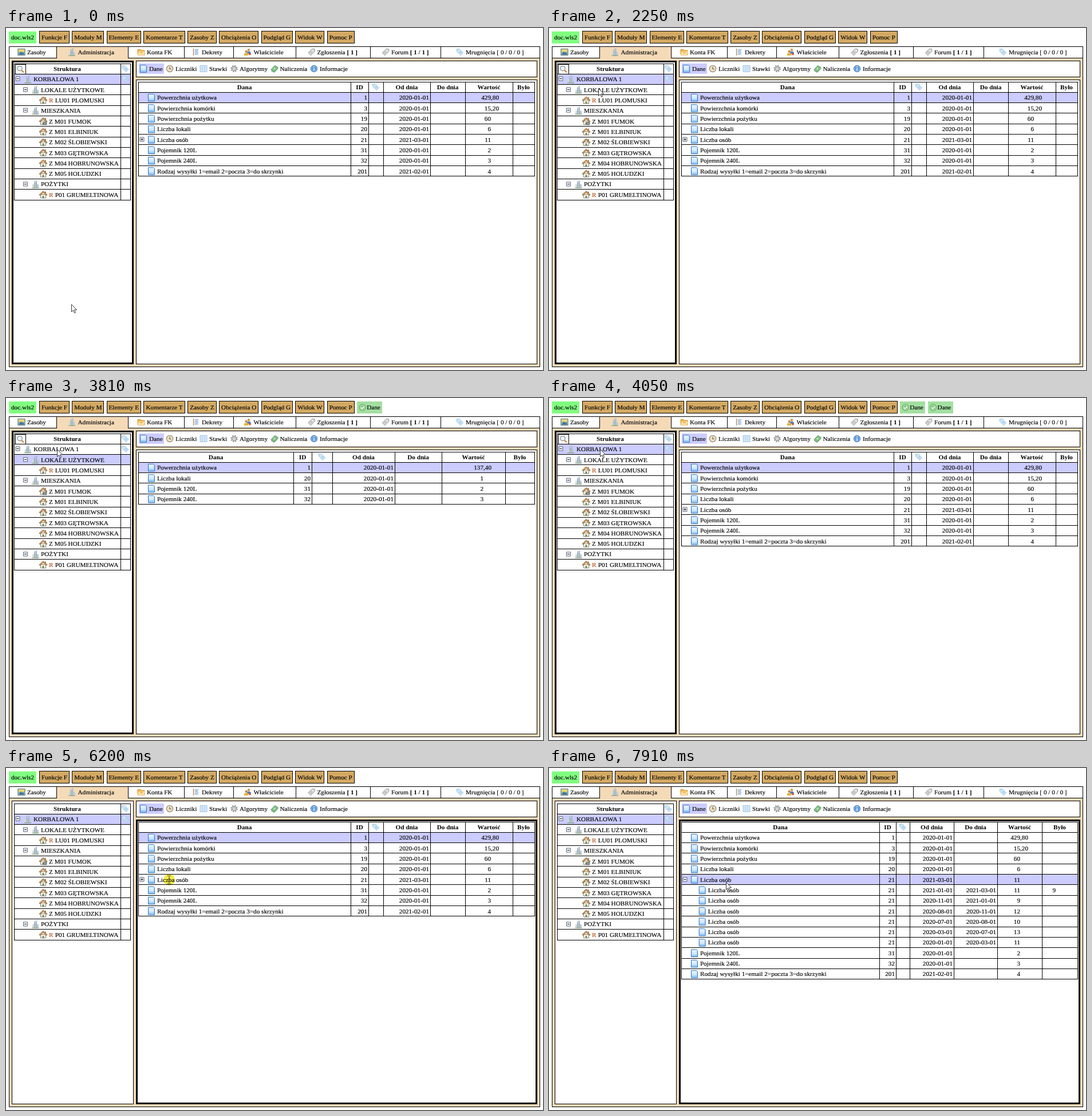
An HTML page that plays this animation: 938 by 597 pixels, repeating every 7.99 s.

```html
<!DOCTYPE html>
<html lang="pl">
<head>
<meta charset="utf-8">
<title>Administracja</title>
<style>
  html, body { margin: 0; width: 100%; height: 100%; overflow: hidden; background: #fff; }
  svg { display: block; }
  text { font: 11.2px "Liberation Serif", "Times New Roman", serif; white-space: pre; color: #000; fill: currentColor; stroke: currentColor; stroke-width: .15px; }
  .b { font-weight: 700; stroke: none; }
  .m { text-anchor: middle; }
  .e { text-anchor: end; }
  .r { color: #b5480f; }
  .crisp { shape-rendering: crispEdges; }
  #click { mix-blend-mode: multiply; }
</style>
</head>
<body>
<svg width="938" height="597" viewBox="0 0 938 597">
  <defs>
    <linearGradient id="sky" x2="0" y2="1"><stop stop-color="#e6f4ff"/><stop offset="1" stop-color="#8cc4f5"/></linearGradient>
    <g id="doc"><path d="M1.5.8h9.2L12.5 2.6v10.8h-11z" fill="url(#sky)" stroke="#3573bd"/><path d="M3.5 4h6M3.5 6.2h7M3.5 8.4h7" stroke="#fff" stroke-width=".9"/></g>
    <g id="building"><path d="M1.5 7h3.5v6H1.5z" fill="#d5ddcf"/><path d="M5 2.8 9 .8V13H5z" fill="#d3e0ec" stroke="#7d92a5" stroke-width=".7"/><path d="M6.2 4.5v7M7.8 4v7.5" stroke="#577b9d" stroke-width=".8" stroke-dasharray="1.2 .8"/><path d="M9.5 7h3v6h-3z" fill="#bcc9d2"/><path d="M1 13.2h12" stroke="#789764"/></g>
    <g id="house"><path d="M2.5 6.5h9v6.3h-9z" fill="#fbf2df" stroke="#6f6350" stroke-width=".8"/><path d="M10 1.5h1.6v3H10z" fill="#8d5a34"/><path d="M.4 7.8 7 1.8l6.6 6" fill="none" stroke="#5a4428" stroke-width="2.3"/><path d="M.7 7.4 7 1.8l6.3 5.6" fill="none" stroke="#e2a95f" stroke-width="1.3"/><path d="M5.6 9h2.8v3.8H5.6z" fill="#5f8c6a"/></g>
    <g id="houseGray"><use href="#house"/><path d="M7.5 8.5h5.5V13H7.5z" fill="#8d9a92" stroke="#555" stroke-width=".7"/></g>
    <g id="tag"><path d="M1.2 1.8 6 1.4l6.6 6.8-4.4 4.6L1.4 6z" fill="#d3ebfa" stroke="#8dbbdc" stroke-width=".8"/><path d="M5 6.5 8.6 10M6.8 5l3.5 3.6" stroke="#72a9d2" stroke-width=".9"/><circle cx="3.4" cy="3.7" r=".9" fill="#fff" stroke="#8dbbdc" stroke-width=".5"/></g>
    <g id="ticket"><path d="M12.8 1.8 8 1.4 1.4 8.2l4.4 4.6L12.6 6z" fill="#dfe2de" stroke="#858b86" stroke-width=".9"/><path d="M9 6.5 5.4 10M7.2 5 3.7 8.6" stroke="#8e9690"/></g>
    <g id="picture"><path d="M.8 1.3h12.4v11.4H.8z" fill="#8fb6a5" stroke="#73848c"/><path d="M2 2.5h10v4H2z" fill="#f0d86d"/><path d="M2 11.5 6 6l2.5 3L10 7l2 4.5z" fill="#426f9c"/></g>
    <g id="folder"><path d="M1 2.5h5l1.2 1.6H13v8H1z" fill="#f1b54b" stroke="#cf8a28" stroke-width=".8"/><path d="M2.7 6h10.8L12 12H1z" fill="#fde2a0"/><path d="M5 8h5" stroke="#d88932"/></g>
    <g id="list"><path d="M2 1h10v12H2z" fill="#eef5fc"/><path d="M2.5 1v12" stroke="#bc8d58" stroke-width="1.4"/><path d="M5 3h6M5 5.5h5M5 8h6M5 10.5h5" stroke="#648fc2"/></g>
    <g id="people"><circle cx="9" cy="3.2" r="2.3" fill="#d49a48"/><path d="M6 10V8q0-2.3 3-2.3T12.8 8v2z" fill="#4d80c6"/><circle cx="4.6" cy="6" r="2.1" fill="#c47d3c"/><path d="M.8 13v-2q0-2.4 3.8-2.4T8.4 11v2z" fill="#e0b43d"/><circle cx="11" cy="10.5" r="1.9" fill="#c95442"/></g>
    <g id="clock"><circle cx="7" cy="7" r="5.7" fill="#ebe2cd" stroke="#99907f" stroke-width="1.3"/><path d="M7 3.5V7l2.7 1" fill="none" stroke="#6b5d45"/><circle cx="7" cy="7" r="1.2" fill="#b8822f"/></g>
    <g id="sheet"><path d="M1 1.5h12v11H1z" fill="#e7f3fd" stroke="#91bbe0" stroke-width=".9"/><path d="M1 4.3h12M1 7.2h12M1 10h12M5 1.5v11M9 1.5v11" stroke="#a8cbea" stroke-width=".8"/></g>
    <g id="gear"><circle cx="7" cy="7" r="5.2" fill="none" stroke="#8d9092" stroke-width="2" stroke-dasharray="2.1 2"/><circle cx="7" cy="7" r="3.6" fill="#e8e8e6" stroke="#939699" stroke-width="1.5"/><circle cx="7" cy="7" r="1.3" fill="#fff" stroke="#8d9092" stroke-width=".6"/></g>
    <g id="cash"><path d="M.8 8.8 7.6 1.5l5.8 3.6-7 7.5z" fill="#7fc184" stroke="#4a8b55" stroke-width=".8"/><path d="m1 10.5 5.5 3 6.8-7" fill="none" stroke="#5a9b62"/><circle cx="7" cy="7" r="1.7" fill="#c6e6b9"/></g>
    <g id="info"><circle cx="7" cy="7" r="5.7" fill="#5b98dc" stroke="#386ca9" stroke-width=".8"/><circle cx="7" cy="7" r="4.3" fill="none" stroke="#b9d7f5" stroke-width=".7"/><path d="M7 3.2v1.6M7 6v4.6" stroke="#fff" stroke-width="1.5"/></g>
    <g id="wait"><path d="M3.5 2h7L7.8 7l2.7 5h-7l2.7-5z" fill="#eef6fb" stroke="#8a98a4" stroke-width=".7"/><path d="M4.5 3h5L7 6zM7 9l2.5 2.8h-5z" fill="#d3a048"/><path d="M2.5 1.6h9M2.5 12.4h9" stroke="#9c7440" stroke-width="1.5"/></g>
    <g id="ok"><circle cx="7" cy="7" r="5.7" fill="#86c983" stroke="#5b9c5c" stroke-width=".8"/><circle cx="7" cy="7" r="4.3" fill="none" stroke="#d5efce" stroke-width=".7"/><path d="m4.3 7 2 2.2 3.6-4" fill="none" stroke="#fff" stroke-width="1.5"/></g>
    <g id="lens"><path d="m8.6 8.8 3.8 3.7" stroke="#d18b3e" stroke-width="2.4"/><circle cx="5.5" cy="5.5" r="4.2" fill="#eaf4fb" stroke="#8b9094" stroke-width="1.3"/></g>
  </defs>
  <g id="stage"></g>
  <circle id="click" r="10" fill="#f6ee48"/>
  <path id="arrow" d="M.5.6V13.4l3-2.8 2.1 4.9 2-.9-2.1-4.7h4.1z" fill="#fff" stroke="#222" stroke-width=".9"/>
  <path id="beam" d="M-3.5-7H-1Q0-7 0-6Q0-7 1-7H3.5M0-6V6M-3.5 7H-1Q0 7 0 6Q0 7 1 7H3.5" fill="none" stroke="#333" stroke-width=".8"/>
</svg>
<script>
const LOOP = 7990, PITCH = 18.33;
const PEACH = '#f5dab8', TAN = '#d3a963', LILAC = '#ccccff', GRAY = '#d2d2d2';
const $ = id => document.getElementById(id);

// drawing helpers
const fill = (x, y, w, h, c) => `<rect class="crisp" x="${x}" y="${y}" width="${w}" height="${h}" fill="${c}"/>`;
const box = (x0, y0, x1, y1, c, w = 1) =>
  `<rect class="crisp" x="${x0 + w / 2}" y="${y0 + w / 2}" width="${x1 - x0 + 1 - w}" height="${y1 - y0 + 1 - w}" fill="${c}" stroke="#000" stroke-width="${w}"/>`;
const text = (x, y, s, cls = '') => `<text x="${x}" y="${Math.round(y)}" class="${cls}">${s}</text>`;
const icon = (id, cx, cy) => `<use href="#${id}" x="${cx - 7}" y="${cy - 7}"/>`;
const bold = s => `<tspan class="b">${s}</tspan>`;
const lineY = (top, k) => Math.floor(top + PITCH * k);
const midY = (top, k) => top + PITCH * (k + .5);

function grid(cols, top, rows) {
  const end = cols[cols.length - 1];
  let d = '';
  for (let k = 0; k <= rows; k++) d += `M${cols[0]} ${lineY(top, k) + .5}H${end + 1}`;
  for (const x of cols) d += `M${x + .5} ${top}V${lineY(top, rows) + 1}`;
  return `<path class="crisp" d="${d}" stroke="#000" fill="none"/>`;
}
const rowFill = (cols, top, k, c) => {
  const y = lineY(top, k);
  return fill(cols[0], y, cols[cols.length - 1] - cols[0], lineY(top, k + 1) - y, c);
};
const toggle = (cx, cy, open) => {
  const y = Math.round(cy) - .5;
  return `<path d="M${cx - 3.5} ${y - 3.5}h7v7h-7z" fill="#f4f7fb" stroke="#5b6674"/>
    <path d="M${cx - 2} ${y}h4${open ? '' : 'm-2-2v4'}" stroke="#111"/>`;
};

// top buttons: label, width, stays while loading
const BUTTONS = [['Funkcje F', 53, 1], ['Moduły M', 56, 1], ['Elementy E', 60, 1], ['Komentarze T', 72.7, 0],
  ['Zasoby Z', 50.5, 1], ['Obciążenia O', 69, 1], ['Podgląd G', 55.4, 1], ['Widok W', 51, 0], ['Pomoc P', 48, 1]];

function toolbar(busy, chips) {
  const gap = 4.4;
  let x = 58, out = fill(5, 6, 48, 21, '#80ff80') + text(29, 20, 'doc.wls2', 'm');
  for (const [label, w, stays] of BUTTONS) {
    if (busy && !stays) continue;
    out += box(Math.round(x), 5, Math.round(x + w) - 1, 26, TAN) + text(x + w / 2, 20, label, 'm');
    x += w + gap;
  }
  for (const kind of chips) {
    out += fill(Math.round(x), 6, 44, 21, kind === 'ok' ? '#a3dfa1' : '#e3e2a0') + icon(kind, x + 9.5, 16.5) + text(x + 17, 20, 'Dane');
    x += 44 + gap;
  }
  return out;
}

// left, right, icon, icon centre, text start, label
const TABS = [[5, 88, 'picture', 27, 37, 'Zasoby'], [88, 213, 'building', 115, 125.5, 'Administracja'],
  [213, 311, 'folder', 236, 246, 'Konta FK'], [311, 397, 'list', 332, 342, 'Dekrety'],
  [397, 506, 'people', 422, 432.5, 'Właściciele'], [506, 636, 'ticket', 533.5, 543.5, 'Zgłoszenia ' + bold('[ 1 ]')],
  [636, 759, 'ticket', 663, 673, 'Forum ' + bold('[ 1 / 1 ]')], [759, 932, 'tag', 793, 803, 'Mrugnięcia [ 0 / 0 / 0 ]']];

const VIEWS = [['doc', 240, 250, 'Dane'], ['clock', 286, 296, 'Liczniki'], ['sheet', 345, 355, 'Stawki'],
  ['gear', 398.5, 408, 'Algorytmy'], ['cash', 469, 478.5, 'Naliczenia'], ['info', 538, 548, 'Informacje']];

function frame() {
  let out = box(5, 52, 932, 591, PEACH);
  TABS.forEach(([x0, x1, ic, cx, tx, label], i) => {
    out += box(x0, 32, x1, 52, i === 1 ? PEACH : '#fff') + icon(ic, cx, 42) + text(tx, 46, label);
  });
  out += fill(89, 52, 124, 1, PEACH);
  out += box(227, 57, 927, 85, '#fff') + fill(232, 62, 44, 18, LILAC);
  for (const [ic, cx, tx, label] of VIEWS) out += icon(ic, cx, 71) + text(tx, 75, label);
  return out;
}

// level, label, mark
const TREE = [[0, 'KORBALOWA 1'], [1, 'LOKALE UŻYTKOWE'], [2, 'LU01 PLOMUSKI', 'R'], [1, 'MIESZKANIA'],
  [2, 'M01 FUMOK', 'Z'], [2, 'M01 ELBINIUK', 'Z'], [2, 'M02 ŚLOBIEWSKI', 'Z'], [2, 'M03 GĘTROWSKA', 'Z'],
  [2, 'M04 HOBRUNOWSKA', 'Z'], [2, 'M05 HOLUDZKI', 'Z'], [1, 'POŻYTKI'], [2, 'P01 GRUMELTINOWA', 'R']];

function tree(sel, pending, focus) {
  const cols = [14, 200, 217], top = 62;
  let out = box(10, 57, 222, 586, '#fff', focus ? 3 : 1) + rowFill(cols, top, sel + 1, LILAC);
  if (pending >= 0) out += rowFill(cols, top, pending + 1, GRAY);
  out += grid(cols, top, TREE.length + 1);
  if (focus) out += box(16, 63, 34, 80, '#fff') + icon('lens', 25.5, 72);
  out += text(107, 74.5, 'Struktura', 'b m') + icon('tag', 208.5, 71) + icon('tag', 208.5, 89);
  TREE.forEach(([level, label, mark], i) => {
    const y = midY(top, i + 1), base = y + 3.7;
    if (level < 2) {
      const x = level * 13.5;
      out += toggle(20.5 + x, y, true) + icon('building', 38 + x, y) + text(48 + level * 13, base, label);
    } else {
      out += icon(i === 4 ? 'houseGray' : 'house', 65, y);
      out += text(75, base, mark, mark === 'R' ? 'r' : '') + text(mark === 'R' ? 85.7 : 84.7, base, label);
    }
  });
  return out;
}

const row = (name, id, from, value, more = {}) => ({ name, id, from, value, ...more });
const NEW_YEAR = '2020-01-01';
const [AREA, FLATS, PEOPLE] = ['Powerzchnia użytkowa', 'Liczba lokali', 'Liczba osób'];
const BINS = [row('Pojemnik 120L', 31, NEW_YEAR, '2'), row('Pojemnik 240L', 32, NEW_YEAR, '3')];
const HEAD = [row(AREA, 1, NEW_YEAR, '429,80'), row('Powierzchnia komórki', 3, NEW_YEAR, '15,20'),
  row('Powierzchnia pożytku', 19, NEW_YEAR, '60'), row(FLATS, 20, NEW_YEAR, '6')];
const TAIL = [...BINS, row('Rodzaj wysyłki 1=email 2=poczta 3=do skrzynki', 201, '2021-02-01', '4')];
const people = open => row(PEOPLE, 21, '2021-03-01', '11', { open });
const HISTORY = [['2021-01', 11, '9'], ['2020-11', 9], ['2020-08', 12], ['2020-07', 10], ['2020-03', 13], ['2020-01', 11]]
  .map(([month, value, was], i, all) =>
    row(PEOPLE, 21, month + '-01', '' + value, { child: true, was, to: (i ? all[i - 1][0] : '2021-03') + '-01' }));

const TABLES = {
  all: { cols: [231, 602, 633, 659, 741, 802, 885, 923], sel: 0, rows: [...HEAD, people(false), ...TAIL] },
  part: { cols: [231, 502, 534, 570, 679, 761, 872, 923], sel: 0,
    rows: [row(AREA, 1, NEW_YEAR, '137,40'), row(FLATS, 20, NEW_YEAR, '1'), ...BINS] },
  open: { cols: [231, 577, 606, 630, 707, 783, 861, 923], sel: 4, rows: [...HEAD, people(true), ...HISTORY, ...TAIL] }
};

function table(name, focus) {
  const { cols, sel, rows } = TABLES[name], top = 94;
  let out = box(227, 90, 927, 586, '#fff', focus ? 3 : 1) + rowFill(cols, top, sel + 1, LILAC) + grid(cols, top, rows.length + 1);
  ['Dana', 'ID', '', 'Od dnia', 'Do dnia', 'Wartość', 'Było'].forEach((label, i) => {
    const x = (cols[i] + cols[i + 1]) / 2;
    out += label ? text(x, 107, label, 'b m') : icon('tag', x, 103);
  });
  rows.forEach((r, i) => {
    const y = midY(top, i + 1), base = y + 3.7, dx = r.child ? 13.7 : 0;
    if ('open' in r) out += toggle(237.5, y, r.open);
    out += icon('doc', 254 + dx, y) + text(264 + dx, base, r.name);
    out += text(cols[2] - 2, base, r.id, 'e') + text(cols[4] - 2, base, r.from, 'e');
    if (r.to) out += text(cols[5] - 2, base, r.to, 'e');
    const [whole, part] = r.value.split(',');
    out += text(cols[6] - 38, base, whole, 'e');
    if (part) out += text(cols[6] - 38, base, ',' + part);
    if (r.was) out += text(cols[7] - 38, base, r.was, 'e');
  });
  return out;
}

// pointer moves: first step, last step, steps, x, y, optional curve control point
const MOVES = [[170, 170, 1, 113, 475], [400, 400, 1, 113, 474], [630, 630, 1, 112, 474],
  [860, 1320, 7, 88, 88, 138, 300], [2020, 2250, 4, 86, 105], [3020, 3100, 2, 86, 103],
  [3240, 3500, 4, 88, 92, 78, 96], [3650, 3650, 1, 89, 89], [5130, 5130, 1, 97, 89],
  [5207, 5900, 10, 283, 193], [6050, 6050, 1, 285, 195], [6830, 6980, 3, 241, 194], [7680, 7910, 4, 309, 199]];
const CLICKS = [[1780, 1850], [2400, 2480], [3730, 3810], [6200, 6320], [7300, 7380]];
const within = (t, a, b) => t >= a && t < b;

function pointer(t) {
  let x = 114, y = 482;
  for (const [t0, t1, n, tx, ty, cx = (x + tx) / 2, cy = (y + ty) / 2] of MOVES) {
    if (t < t0) break;
    const k = n > 1 ? Math.min(n, Math.floor((t - t0) / (t1 - t0) * (n - 1) + 1e-6) + 1) : 1;
    const s = k / n, u = s * s * (3 - 2 * s), v = 1 - u;
    x = v * v * x + 2 * u * v * cx + u * u * tx;
    y = v * v * y + 2 * u * v * cy + u * u * ty;
  }
  return [Math.round(x), Math.round(y)];
}

function chipsAt(t) {
  if (t < 2550 || t >= 5610) return [];
  if (t < 2790) return ['wait'];
  if (t < 3880) return ['ok'];
  if (t < 4050) return ['ok', 'wait'];
  return t < 4350 ? ['ok', 'ok'] : ['ok'];
}

const still = frame();
let shown = '';

function draw(now) {
  const t = now % LOOP;
  const part = within(t, 2790, 4050), right = t >= 6200;
  const pending = within(t, 2550, 2790) ? 1 : within(t, 3880, 4050) ? 0 : -1;
  const chips = chipsAt(t), view = part ? 'part' : t >= 7450 ? 'open' : 'all';
  const key = [pending, chips, view, right].join();
  if (key !== shown) {
    shown = key;
    $('stage').innerHTML = toolbar(pending >= 0, chips) + still + tree(+part, pending, !right) + table(view, right);
  }
  const [x, y] = pointer(t), overText = within(t, 5820, 6830);
  for (const id of ['arrow', 'beam', 'click']) $(id).setAttribute('transform', `translate(${x} ${y})`);
  $('arrow').style.display = overText ? 'none' : '';
  $('beam').style.display = overText ? '' : 'none';
  $('click').style.display = CLICKS.some(([a, b]) => within(t, a, b)) ? '' : 'none';
  requestAnimationFrame(draw);
}
draw(0);
</script>
</body>
</html>
```
